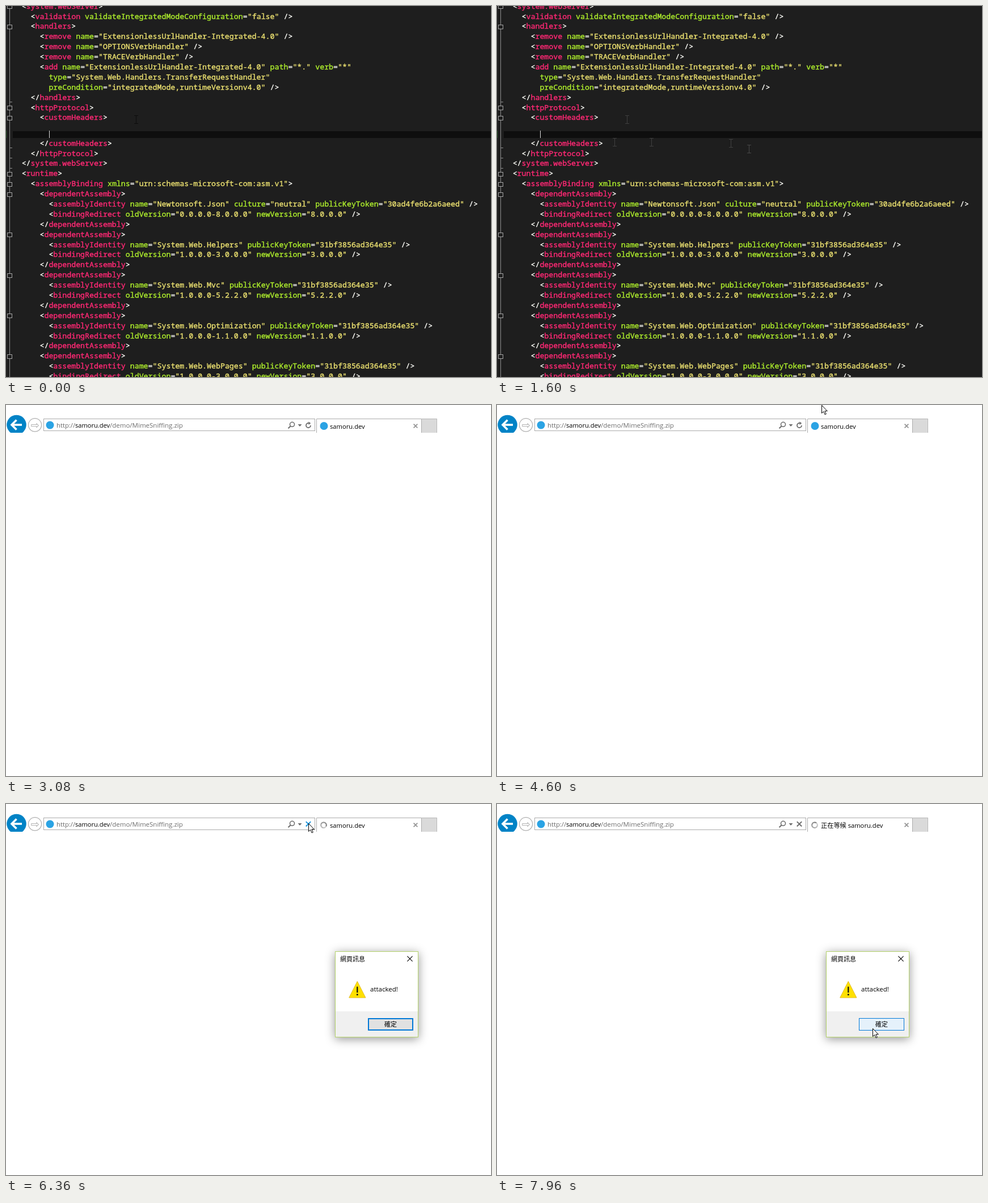
These frames come from a looping animation (855 px wide and 655 px high, 8000 ms). An HTML page with a canvas:

```html
<!DOCTYPE html>
<html lang="en">
<head>
<meta charset="utf-8">
<title>Header demo</title>
<style>
html, body { margin: 0; width: 100%; height: 100%; overflow: hidden; background: #fff; }
canvas { display: block; }
</style>
</head>
<body>
<canvas id="stage" width="855" height="655"></canvas>
<script>
const ctx = document.getElementById('stage').getContext('2d');
const W = 855, H = 655, LOOP = 8000;
const CODE_FONT = '13.27px "Noto Sans Mono", monospace';
const UI = '"Open Sans", "Noto Sans CJK TC", "Noto Sans CJK", sans-serif';
const HOST = 'samoru.dev';
const CHAR = 7.963, LEFT = 11.7, ROW = 17.89;
const BG = '#1e1e1e';

// ---------- helpers ----------
function rect(x, y, w, h, fill) {
  ctx.fillStyle = fill;
  ctx.fillRect(x, y, w, h);
}
function frame(x, y, w, h, color) {
  ctx.strokeStyle = color;
  ctx.lineWidth = 1;
  ctx.strokeRect(x + 0.5, y + 0.5, w - 1, h - 1);
}
function line(points, color, width = 1) {
  ctx.beginPath();
  points.forEach(([x, y]) => ctx.lineTo(x, y));
  ctx.strokeStyle = color;
  ctx.lineWidth = width;
  ctx.stroke();
}
function poly(points, fill, stroke) {
  ctx.beginPath();
  points.forEach(([x, y]) => ctx.lineTo(x, y));
  ctx.closePath();
  ctx.fillStyle = fill;
  ctx.fill();
  if (stroke) {
    ctx.strokeStyle = stroke;
    ctx.lineWidth = 1;
    ctx.stroke();
  }
}
function disc(x, y, r, fill) {
  ctx.beginPath();
  ctx.arc(x, y, r, 0, Math.PI * 2);
  ctx.fillStyle = fill;
  ctx.fill();
}
function arc(x, y, r, from, to, color, width) {
  ctx.beginPath();
  ctx.arc(x, y, r, from, to);
  ctx.strokeStyle = color;
  ctx.lineWidth = width;
  ctx.stroke();
}
function label(text, x, y, size, color, align = 'left') {
  ctx.font = `${size}px ${UI}`;
  ctx.textAlign = align;
  ctx.fillStyle = color;
  ctx.fillText(text, x, y);
  ctx.textAlign = 'left';
}
function cross(x, y, r, color, width) {
  line([[x - r, y - r], [x + r, y + r]], color, width);
  line([[x + r, y - r], [x - r, y + r]], color, width);
}
const clamp = (v, lo, hi) => Math.max(lo, Math.min(hi, v));

// Position along [time, x, y] keys
function along(keys, t) {
  const i = keys.findIndex(key => t <= key[0]);
  if (i <= 0) return (i ? keys[keys.length - 1] : keys[0]).slice(1);
  const [t0, x0, y0] = keys[i - 1], [t1, x1, y1] = keys[i];
  const k = (t - t0) / (t1 - t0);
  return [x0 + (x1 - x0) * k, y0 + (y1 - y0) * k];
}

// ---------- editor ----------
const KEY = '31bf3856ad364e35';
function binding(name, version, from = '1.0.0.0', key = KEY, extra = '') {
  return `      <dependentAssembly>
        <assemblyIdentity name="${name}" ${extra}publicKeyToken="${key}" />
        <bindingRedirect oldVersion="${from}-${version}" newVersion="${version}" />
      </dependentAssembly>`;
}
const source = [
  '  <system.webServer>',
  '    <validation validateIntegratedModeConfiguration="false" />',
  '    <handlers>',
  '      <remove name="ExtensionlessUrlHandler-Integrated-4.0" />',
  '      <remove name="OPTIONSVerbHandler" />',
  '      <remove name="TRACEVerbHandler" />',
  '      <add name="ExtensionlessUrlHandler-Integrated-4.0" path="*." verb="*"',
  '        type="System.Web.Handlers.TransferRequestHandler"',
  '        preCondition="integratedMode,runtimeVersionv4.0" />',
  '    </handlers>',
  '    <httpProtocol>',
  '      <customHeaders>',
  '',
  ' '.repeat(8),
  '      </customHeaders>',
  '    </httpProtocol>' + ' '.repeat(6),
  '  </system.webServer>',
  '  <runtime>',
  '    <assemblyBinding xmlns="urn:schemas-microsoft-com:asm.v1">',
  binding('Newtonsoft.Json', '8.0.0.0', '0.0.0.0', '30ad4fe6b2a6aeed', 'culture="neutral" '),
  binding('System.Web.Helpers', '3.0.0.0'),
  binding('System.Web.Mvc', '5.2.2.0'),
  binding('System.Web.Optimization', '1.1.0.0'),
  binding('System.Web.WebPages', '3.0.0.0')
].join('\n').split('\n');

// The caret row is shorter than the others
const CARET_ROW = 13, CARET_HEIGHT = 13.4;
const rowTop = i => i * ROW - 12.6 + 3.9 - (i > CARET_ROW ? ROW - CARET_HEIGHT + 4 : i === CARET_ROW ? 4 : 0);
const rows = source.map((text, i) => ({ text, top: Math.round(rowTop(i)), base: rowTop(i) + 13.4 }));
const column = n => LEFT + n * CHAR;

function drawCode({ text, base }) {
  let afterOpen = false;
  for (const { 0: word, index } of text.matchAll(/<\/?|\/?>|=|"[^"]*"|[\w.]+/g)) {
    let color = '#fafaf5';
    if (word[0] === '"') color = '#ebe070';
    else if (/\w/.test(word)) color = afterOpen ? '#ff2874' : '#aeee2c';
    afterOpen = word[0] === '<';
    ctx.fillStyle = ctx.strokeStyle = color;
    ctx.fillText(word, column(index), base);
    ctx.strokeText(word, column(index), base);
  }
}

function drawGutter() {
  rect(6, 0, 1, H, '#8f8f8f');
  for (const { text, top } of rows) {
    const tag = text.trim();
    if (/^<\/(?!dep)/.test(tag)) rect(6, top + 17, 5, 1, '#8f8f8f');
    if (/^<\w.*[^\/]>$/.test(tag)) {
      rect(2, top + 6, 9, 8, BG);
      frame(2, top + 6, 9, 8, '#a5a5a5');
    }
  }
  rect(0, 220, 1, 13, '#245024');
}

const SELECT = 320, CLICK = 1300, BLUR = 2800, BLINK = 530;
const SEL_FIRST = 8, SEL_LAST = 16;
const beamPath = [
  [0, 229, 200], [SELECT, 76, 143], [650, 213, 279], [880, 213, 279], [1040, 207, 240],
  [1400, 272, 240], [1560, 412, 242], [1680, 507, 272], [2100, 545, 625]
];
// Marks the pointer leaves around the caret row
const marks = beamPath.filter(([, , y]) => y >= 200 && y < 250);

function beam(x, y, color) {
  x = Math.round(x);
  y = Math.round(y);
  rect(x, y - 7, 1, 15, color);
  rect(x - 3, y - 7, 7, 1, color);
  rect(x - 3, y + 7, 7, 1, color);
}

function drawSelection([mx, my]) {
  let caret;
  for (let i = SEL_FIRST; i <= SEL_LAST && my >= rows[i].top; i++) {
    const { text, top } = rows[i], bottom = rows[i + 1].top;
    const left = i === SEL_FIRST ? 75 : 12;
    const end = Math.round(column(text.length + (i < SEL_LAST ? 1 : 0)));
    const right = my < bottom ? clamp(mx, left, end) : end;
    rect(left, top, right - left, bottom - top, '#464646');
    caret = [right, top, bottom - top];
  }
  return caret;
}

function drawEditor(t) {
  rect(0, 0, W, H, BG);
  const mouse = along(beamPath, t);
  let caret;
  if (t >= SELECT && t < CLICK) {
    caret = drawSelection(mouse);
  } else if (t < BLUR) {
    rect(12, 221, W - 12, 12, '#0e0e0e');
    const on = t < SELECT || Math.floor((t - CLICK) / BLINK) % 2 === 0;
    if (on) caret = [76, 220, 13];
  } else {
    rect(12, 220, W - 12, 13, '#242424');
  }
  drawGutter();
  ctx.font = CODE_FONT;
  ctx.lineWidth = 0.4;
  rows.forEach(drawCode);
  for (const [start, x, y] of marks) if (t > start) beam(x, y, '#404040');
  if (t < 2100) beam(...mouse, t < 880 ? '#0c0c0c' : '#484848');
  if (caret) rect(Math.round(caret[0]), caret[1], 1, caret[2], '#dcdcdc');
}

// ---------- browser ----------
const LOAD = 6120, ALERT = 6280, HOVER = 6960, WAIT = 7800;
const pointerPath = [
  [3640, 655, 630], [3840, 475, 270], [4160, 475, 270], [4320, 505, 153],
  [4600, 572, 0], [5320, 531, 26], [5440, 531, 26], [5680, 533, 34],
  [6380, 533, 34], [6720, 667, 379], [HOVER, 667, 379], [7720, 662, 396]
];
const GREY = '#6d6d6d', EDGE = '#ababab', BLUE = '#1c94dc', LOGO = '#2ba3e4';
const TURN = Math.PI * 2;

function drawNavigation() {
  ctx.save();
  ctx.beginPath();
  ctx.rect(0, 0, 66, 49);
  ctx.clip();
  disc(18.5, 35, 17.3, '#0083c6');
  line([[10, 35], [28, 35]], '#fff', 3.6);
  line([[18.5, 26.5], [10, 35], [18.5, 43.5]], '#fff', 3.6);
  arc(51, 35.3, 11.6, 0, TURN, '#b0b0b0', 1.2);
  ctx.font = '18px "DejaVu Sans", sans-serif';
  ctx.textAlign = 'center';
  ctx.fillStyle = '#a8a8a8';
  ctx.fillText('⇨', 51, 41.5);
  ctx.restore();
}

function drawRefresh(color) {
  arc(533, 36, 4, 0, TURN * 0.77, color, 1.8);
  poly([[533.3, 29.3], [533.3, 35], [537.3, 32.2]], color);
}

function drawAddress(t) {
  frame(66, 24, 479, 22, EDGE);
  disc(77.5, 35.5, 7, LOGO);
  label('http://', 89, 40, 11.3, GREY);
  label(HOST, 122, 40, 11.1, '#000');
  label('/demo/MimeSniffing.zip', 183, 40, 11.5, GREY);
  arc(504.5, 34.3, 4, 0, TURN, GREY, 1.6);
  line([[501.6, 37.2], [497.5, 41.3]], GREY, 2);
  poly([[514.5, 34], [521.5, 34], [518, 38]], GREY);
  const color = t > 5160 && t < 6420 ? BLUE : GREY;
  if (t >= LOAD) cross(533, 35.3, 4.2, color, 2);
  else drawRefresh(color);
}

function drawSpinner(t) {
  const parts = 20, step = TURN / parts, turn = t / 900 * TURN;
  for (let i = 0; i < parts; i++) {
    const shade = Math.round(205 - 95 * i / parts);
    arc(560, 37.2, 4.8, turn + i * step, turn + (i + 1.15) * step, `rgb(${shade},${shade},${shade})`, 2);
  }
}

function drawTab(t) {
  line([[547.5, 49], [547.5, 24.5], [732.5, 24.5], [732.5, 49]], EDGE);
  rect(733, 24, 27, 25, '#dadada');
  line([[732.5, 24.5], [759.5, 24.5], [759.5, 49]], '#b8b8b8');
  if (t >= LOAD) drawSpinner(t);
  else disc(560.5, 37, 7, LOGO);
  label((t >= WAIT ? '正在等候 ' : '') + HOST, 571, 42, 11.2, '#000');
  cross(722, 37, 3.4, '#969696', 1.8);
}

function drawTooltip() {
  rect(539, 60, 78, 17, '#9c9c9c');
  rect(536, 57, 79, 18, '#fff');
  frame(536, 57, 79, 18, '#767676');
  label('重新整理 (F5)', 541.5, 70, 11.2, '#575757');
}

function drawButton(t) {
  const x = 638, y = 378, w = 80, h = 22;
  const hover = clamp((t - HOVER) / 200, 0, 1);
  const inset = hover < 0.5 ? 2 : 1;
  const [r, g, b] = [4, 16, 26].map(d => Math.round(225 + d * hover));
  rect(x, y, w, h, '#0078d7');
  rect(x + inset, y + inset, w - 2 * inset, h - 2 * inset, `rgb(${r},${g},${b})`);
  label('確定', x + w / 2, y + 15, 11, '#000', 'center');
}

function drawDialog(t) {
  const x = 580, y = 260, w = 147, h = 152;
  ctx.save();
  ctx.shadowColor = 'rgba(0,0,0,0.42)';
  ctx.shadowBlur = 16;
  ctx.shadowOffsetY = 3;
  rect(x, y, w, h, '#fff');
  ctx.restore();
  rect(x, y + 106, w, h - 106, '#f0f0f0');
  frame(x, y, w, h, '#b5d36c');
  label('網頁訊息', x + 9, y + 17.5, 11, '#000');
  cross(712, 273.3, 4.6, '#111', 1.2);
  poly([[619.3, 313], [634, 342], [604.7, 342]], '#ffe000', '#e3bd2c');
  line([[619.3, 322.5], [619.3, 333]], '#111', 2.2);
  disc(619.3, 336.6, 1.5, '#111');
  label('attacked!', x + 62, y + 71, 11.5, '#000');
  drawButton(t);
}

function drawPointer(x, y) {
  ctx.save();
  ctx.translate(Math.round(x) + 0.5, Math.round(y) + 0.5);
  poly([[0, 0], [0, 14], [3.2, 11], [5.6, 16.4], [7.8, 15.4], [5.4, 10.2], [9.8, 10.2]], '#fff', '#000');
  ctx.restore();
}

function drawBrowser(t) {
  rect(0, 0, W, H, '#fff');
  drawNavigation();
  drawAddress(t);
  drawTab(t);
  if (t >= 5280 && t < LOAD) drawTooltip();
  if (t >= ALERT) drawDialog(t);
  if ((t >= 3640 && t < 4320) || t >= 4600) drawPointer(...along(pointerPath, t));
}

// ---------- loop ----------
function tick(now) {
  const t = Math.floor((now % LOOP) / 40) * 40;
  if (t < 3080) drawEditor(t);
  else drawBrowser(t);
  requestAnimationFrame(tick);
}
requestAnimationFrame(tick);
</script>
</body>
</html>
```
